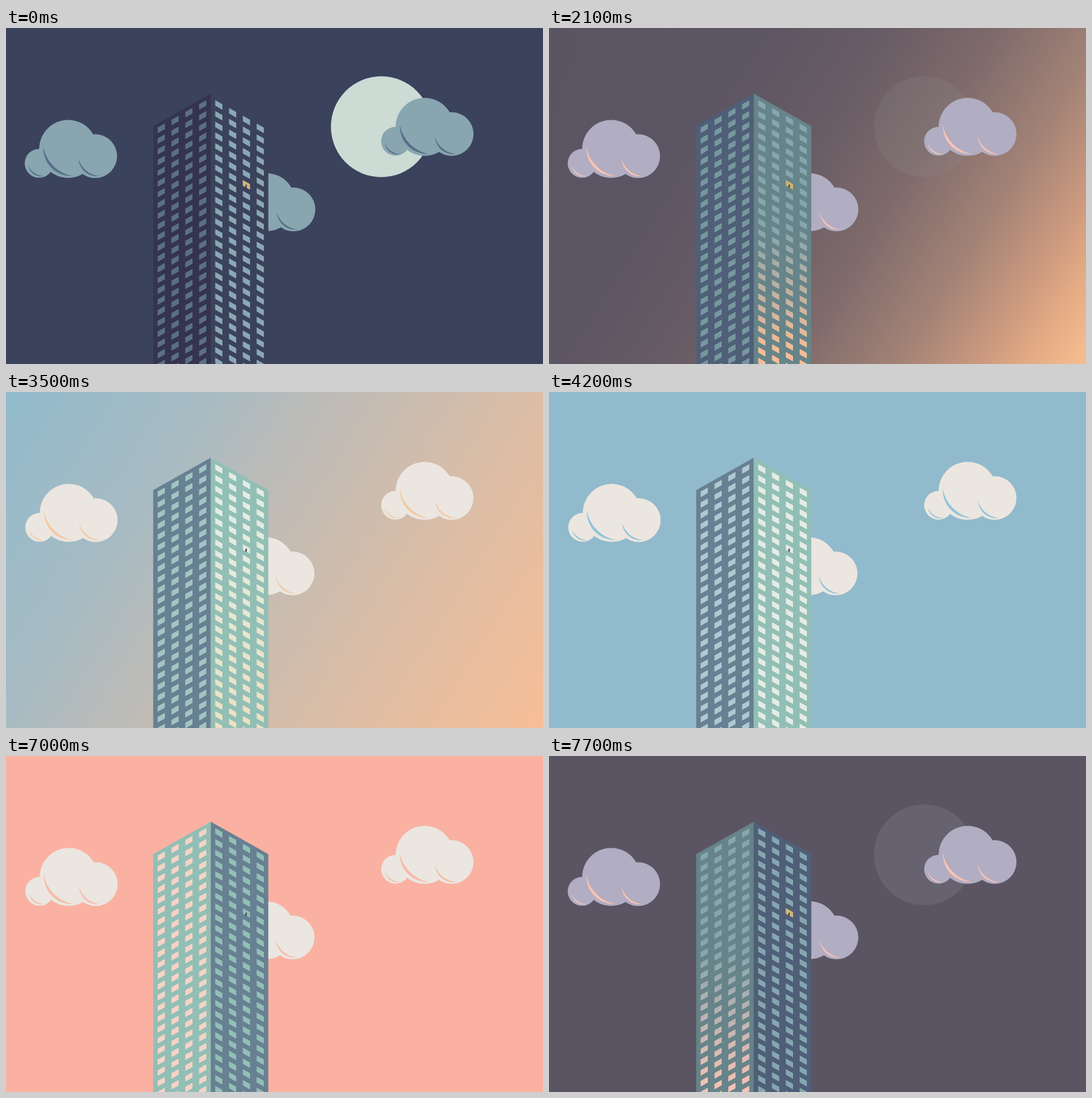
An HTML page with a canvas that plays this animation: 933 by 583 pixels, repeating every 8400 ms.

```html
<!DOCTYPE html>
<html lang="en">
<head>
<meta charset="utf-8">
<title>Tower through the day</title>
<style>
  html, body { margin: 0; width: 100%; height: 100%; overflow: hidden; }
  canvas { display: block; }
</style>
</head>
<body>
<canvas id="stage" width="933" height="583"></canvas>
<script>
const W = 933, H = 583, LOOP = 8400;
const ctx = document.getElementById('stage').getContext('2d');

// stops: offset, color, offset, color, ...
function linear(x0, y0, x1, y1, ...stops) {
  const gradient = ctx.createLinearGradient(x0, y0, x1, y1);
  for (let i = 0; i < stops.length; i += 2) gradient.addColorStop(stops[i], stops[i + 1]);
  return gradient;
}
const vertical = (y0, y1, from, to) => linear(0, y0, 0, y1, 0, from, 1, to);

// Skies blend from a lower corner to the opposite upper one.
const dawnSky = linear(W, H, 0, 0,
  0, '#f6be90', .08, '#e3ab84', .14, '#cd9a7f', .25, '#a38376',
  .4, '#7e6a6b', .55, '#685c65', .72, '#5c5563', 1, '#5b5463');
const morningSky = linear(W, H, 0, 0,
  0, '#f7be97', .28, '#dcbda5', .6, '#b9bbb9', .72, '#a8bbc2', 1, '#91bacc');
const eveningSky = linear(0, H, W, 0,
  0, '#fcaf9f', .28, '#ddb3ac', .6, '#bbb7b9', .72, '#a8b8c1', 1, '#8fbcc8');

const dim = { cloud: '#b1adc2', shade: '#f9c3b3', shift: 0 };
const bright = { cloud: '#ebe6e0', shift: 1 };
const teal = '#92bfb5', slate = '#678092', white = '#e4ece4';

const night = {
  sky: '#3b425c', cloud: '#88a5b0', shade: '#566d87', shift: 0, moon: '#cddbd5',
  left: '#35344f', right: '#3b425c', leftWin: '#5a6f86', rightWin: '#8aa8b3', lit: '#cfb478'
};
const dawn = {
  ...dim, sky: dawnSky, moon: 'rgba(140,138,138,.2)',
  left: '#4f5f78', right: '#668489', leftWin: '#76989d',
  rightWin: vertical(350, 560, '#86a6af', '#f5bd95'), lit: '#cbb26c'
};
const sunrise = {
  ...bright, sky: '#f7be97', shade: '#ecd69a',
  left: slate, right: teal, leftWin: teal, rightWin: '#eedda8', lit: '#f5c592'
};
const morning = {
  ...bright, sky: morningSky, shade: '#f3cba6',
  left: slate, right: teal, leftWin: '#a2c4c3',
  rightWin: linear(460, H, 310, 250, 0, '#eedfbd', 1, white)
};
const day = {
  ...bright, sky: '#91bacc', shade: '#90c4da',
  left: slate, right: teal, leftWin: '#b0c8d0', rightWin: white
};
const evening = {
  ...bright, sky: eveningSky, shade: '#f9b9a8',
  left: teal, right: slate, rightWin: teal,
  leftWin: linear(250, H, 400, 250, 0, '#f0d6cc', .8, white, 1, white)
};
const sunset = {
  ...bright, sky: '#fab1a1', shade: '#f9b9a8',
  left: teal, right: slate, leftWin: '#f5d3c6', rightWin: teal
};
const dusk = {
  ...dim, sky: '#5b5463', moon: '#66626f',
  left: '#668489', right: '#4f5f78', rightWin: '#86a6af',
  leftWin: vertical(340, 570, '#86a6af', '#f5c1b5'), lit: '#d2b878'
};

const timeline = [
  [0, night], [2100, dawn], [2800, sunrise], [3500, morning],
  [4200, day], [6300, evening], [7000, sunset], [7700, dusk]
];

function circle(x, y, r, fill) {
  ctx.fillStyle = fill;
  ctx.beginPath();
  ctx.arc(x, y, r, 0, Math.PI * 2);
  ctx.fill();
}

function polygon(fill, ...points) {
  ctx.fillStyle = fill;
  ctx.beginPath();
  points.forEach(([x, y]) => ctx.lineTo(x, y));
  ctx.fill();
}

function crescent(x0, y0, x1, y1, fill) {
  const chord = Math.hypot(x1 - x0, y1 - y0), outer = chord * .68, inner = chord * .88;
  ctx.fillStyle = fill;
  ctx.fill(new Path2D(
    `M${x0} ${y0}A${outer} ${outer} 0 0 0 ${x1} ${y1}A${inner} ${inner} 0 0 1 ${x0} ${y0}Z`));
}

function cloud(x, y, { cloud: fill, shade }) {
  ctx.save();
  ctx.translate(x, y);
  circle(-50.5, 25, 25, fill);
  crescent(-69, 29, -42, 47, shade);
  circle(0, 0, 50.3, fill);
  circle(47, 12.5, 38, fill);
  crescent(-43, -3, 7, 47, shade);
  crescent(18, 17.5, 54, 47, shade);
  ctx.restore();
}

const CORNER = 355.75, TOP = 114, SLOPE = .5625, ROW = 18.62;

// side: -1 for the left face, 1 for the right one
function pane(side, column, row, fill) {
  const near = 7.75 + column * 24, far = near + 12.5;
  const y = d => TOP + 11.7 + d * SLOPE + row * ROW;
  polygon(fill,
    [CORNER + side * near, y(near) - 4.8], [CORNER + side * far, y(far) - 4.8],
    [CORNER + side * far, y(far) + 4.8], [CORNER + side * near, y(near) + 4.8]);
}

function face(side, wall, windows) {
  const edge = CORNER + side * 100;
  polygon(wall, [CORNER, TOP], [edge, TOP + 100 * SLOPE], [edge, H], [CORNER, H]);
  for (let column = 0; column < 4; column++)
    for (let row = 0; row < 25; row++) pane(side, column, row, windows);
}

function person() {
  circle(417.4, 272.6, 1, '#343a4c');
  polygon('#343a4c', [416.2, 273], [418.4, 273], [418, 277.6], [415.8, 276.8]);
}

function draw(scene) {
  ctx.fillStyle = scene.sky;
  ctx.fillRect(0, 0, W, H);
  if (scene.moon) circle(652, 171.3, 87.5, scene.moon);
  cloud(108 + scene.shift, 209.8, scene);
  cloud(727.3, 171.5, scene);
  cloud(452.5 - scene.shift * 1.5, 302.3, scene);
  face(-1, scene.left, scene.leftWin);
  face(1, scene.right, scene.rightWin);
  if (scene.lit) pane(1, 2, 6, scene.lit);
  person();
}

let shown;
function tick() {
  const t = performance.now() % LOOP;
  const scene = timeline.findLast(([start]) => t >= start)[1];
  if (scene !== shown) draw(shown = scene);
  requestAnimationFrame(tick);
}
tick();
</script>
</body>
</html>
```
